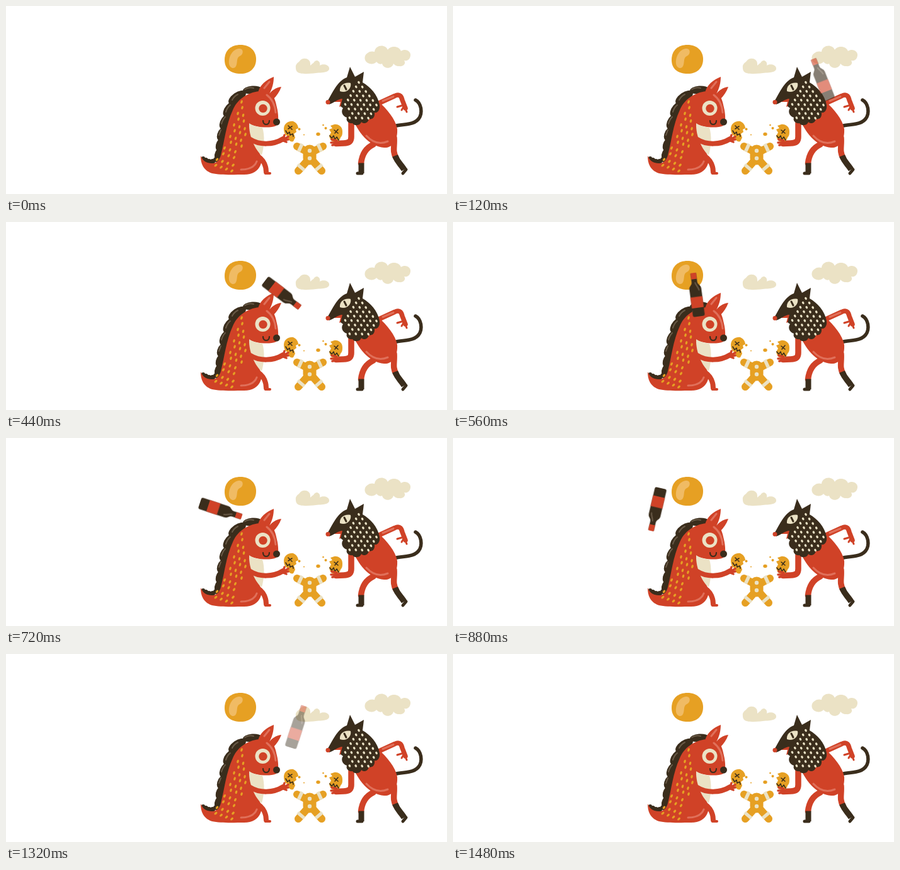
Recreate the animation shown at these times as an HTML page. Size 700 by 300 pixels, loop 1.52 s.

```html
<!DOCTYPE html>
<html lang="en">
<head>
<meta charset="utf-8">
<title>Bottle toss</title>
<style>
html, body { margin: 0; width: 100%; height: 100%; overflow: hidden; background: #fff; }
svg { display: block; width: 700px; height: 300px; }
.red { fill: #d04227; } .dark { fill: #3a2d1c; } .gold { fill: #e6a023; } .cream { fill: #ebe2c5; }
.line { fill: none; stroke-linecap: round; stroke-linejoin: round; }
.flat { stroke-linecap: butt; }
.sr { stroke: #d04227; } .sd { stroke: #3a2d1c; } .sg { stroke: #e6a023; } .sc { stroke: #ebe2c5; }
.shine { stroke: #e0705a; } .sheen { stroke: #695a47; }

.slide { animation: slide 1520ms linear infinite, fade 1520ms linear infinite; }
.spin { animation: spin 1520ms linear infinite; }
@keyframes slide {
  0% { transform: translate(632px, 115px); }
  9.21% { transform: translate(577px, 116px); }
  18.42% { transform: translate(514px, 118px); }
  27.63% { transform: translate(449px, 116px); }
  36.84% { transform: translate(386px, 115px); }
  47.37% { transform: translate(342px, 115px); }
  57.89% { transform: translate(322px, 115px); }
  61.84% { transform: translate(317px, 115px); }
  65.79% { transform: translate(324px, 115px); }
  73.68% { transform: translate(367px, 115px); }
  86.84% { transform: translate(462px, 115px); }
  100% { transform: translate(575px, 115px); }
}
@keyframes spin {
  0% { transform: rotate(0deg); }
  9.21% { transform: rotate(-25deg); }
  18.42% { transform: rotate(-94deg); }
  27.63% { transform: rotate(-209deg); }
  36.84% { transform: rotate(-366deg); }
  47.37% { transform: rotate(-610deg); }
  57.89% { transform: rotate(-885deg); }
  65.79% { transform: rotate(-1090deg); }
  73.68% { transform: rotate(-1272deg); }
  80.26% { transform: rotate(-1366deg); }
  86.84% { transform: rotate(-1422deg); }
  100% { transform: rotate(-1440deg); }
}
@keyframes fade {
  0% { opacity: 0; }
  13% { opacity: 1; }
  78.9% { opacity: 1; }
  93.4%, 100% { opacity: 0; }
}
</style>
</head>
<body>
<svg viewBox="0 0 700 300">
  <!-- sky -->
  <path class="gold" d="M347 86C347 70 358 62 372 62C388 62 397 72 397 85C397 100 386 108 373 108C356 108 347 100 347 86Z"/>
  <path d="M370 68C377 67 378 77 371 80C365 83 368 91 365 96C363 101 355 100 354 92C353 80 360 69 370 68Z" fill="#f0bb64"/>
  <path class="cream" d="M460 99C459 93 463 91 466 88C470 82 479 83 482 88C483 90 483 92 483 95C485 93 486 92 488 91C492 83 500 88 498 95C502 92 512 93 513 99C514 107 500 106 492 107C483 108 472 109 466 107C462 106 460 103 460 99Z"/>
  <path class="cream" d="M577 92C568 90 567 79 574 75C577 72 582 72 585 73C586 62 602 60 606 70C610 63 624 63 627 72C634 67 643 72 642 79C641 87 635 88 632 87C636 93 629 97 624 96C619 96 617 94 615 92C613 101 599 101 597 92C593 94 590 91 588 89C586 92 581 93 577 92Z"/>

  <!-- beast -->
  <g id="mane" class="dark"></g>
  <path class="red" d="M309 239C309 250 312 262 327 267C340 270 362 269 378 269C396 269 406 258 406 243C400 228 392 215 388 196L387 188C394 193 418 196 429 191C434 186 432 170 430 162C428 152 426 145 421 140L402 136C383 138 367 149 360 166C349 190 347 215 341 238C338 250 330 253 320 250C314 248 312 245 309 239Z"/>
  <path class="red" d="M400 139C402 126 413 118 425 113C425 122 423 132 417 142ZM416 143C421 135 428 130 437 129C434 137 430 143 424 149Z"/>
  <g class="line sheen" stroke-width="2">
    <path d="M379 133Q385 129 393 131M359 150Q362 144 368 141M349 169Q351 162 356 158M342 188Q344 181 348 177M338 206L341 198"/>
  </g>
  <path class="cream" d="M386 187C391 191 400 193 407 194C411 207 410 224 406 238C397 232 385 209 386 187Z"/>
  <path class="line sr" stroke-width="8" d="M388 213C402 222 424 222 440 212"/>
  <path class="line sr" stroke-width="8" d="M399 239C408 245 413 254 413 265"/>
  <path class="line sr" stroke-width="4" d="M412 267H419"/>
  <g id="scales" class="gold"></g>
  <g class="line shine" stroke-width="3">
    <path d="M373 261C387 261 395 256 398 248M414 142C422 148 427 158 428 170M418 121L410 131"/>
  </g>
  <circle class="cream" cx="407.5" cy="163" r="12"/>
  <circle class="red" cx="408" cy="163.5" r="6.7"/>
  <circle class="dark" cx="429.5" cy="185" r="5.5"/>
  <path class="line sd" stroke-width="2.2" d="M408 183C408 191 418 191 418 183"/>

  <!-- wolf -->
  <path class="line sd" stroke-width="5.5" d="M616 192C625 189 632 190 640 188C652 186 661 178 658.5 163C657 156 654 152 650 150"/>
  <g class="line sr">
    <path stroke-width="7.5" d="M592 155L617 143.500C626 139 628 146 629 150L634 163"/>
    <path stroke-width="3" d="M628 159L621 161M631 161L628 166M634 164L636 169"/>
    <path stroke-width="9.500" d="M583 221C570 227 565 238 563.500 251M616 210C617 225 613 231 619 242"/>
    <path stroke-width="9.500" d="M548 185V209C548 217 543 219 536 219L524 219.500"/>
  </g>
  <path class="red" d="M551 182C562 206 578 224 600 226C615 227 622 212 621 196C618 180 605 165 591 152L570 165Z"/>
  <g class="line shine" stroke-width="3">
    <path d="M572 207C582 218 594 221 606 216M598 151.500L615 144.500"/>
  </g>
  <g class="line sd">
    <path class="flat" stroke-width="9" d="M564 250.500V267"/>
    <path class="flat" stroke-width="9.500" d="M617.500 239C622 250 627 253 632 261"/>
    <path stroke-width="5" d="M565 267H558M635 261L630 267"/>
  </g>
  <path class="red" d="M517 153L535 145L538 157L529 161L531 153Z"/>
  <path class="dark" d="M510 152C518 140 525 120 541 114L546 97L554 113L568 105L566 122C578 129 590 141 593 158C594 166 590 171 585 170C586 178 581 182 576 180C575 187 568 189 564 185C562 191 553 192 550 187C544 188 539 183 541 178C534 176 531 168 535 163L531 160L534 148C527 148 520 155 513 157Z"/>
  <g id="flecks" class="cream"></g>
  <circle class="red" cx="511" cy="153.5" r="3.5"/>
  <path class="cream" d="M530 136C529 127 537 121 547 123C549 131 541 140 530 136Z"/>
  <path class="line sd" stroke-width="3" d="M537 127L540 133"/>

  <!-- biscuit -->
  <g class="line sg">
    <path stroke-width="12" d="M462 224L477 232M503 224L488 232M464 263L479 246M501 263L486 246"/>
    <path stroke-width="21" d="M482 232V243"/>
  </g>
  <path class="line sc flat" stroke-width="5.5" d="M464.500 232L470 220M500.500 232L495 220M463 253L473.500 262M502 253L491.500 262"/>
  <circle class="cream" cx="482" cy="231" r="3.2"/>
  <circle class="cream" cx="482" cy="243" r="3.2"/>
  <g class="gold">
    <path d="M441 195C442 186 450 183 456 184C461 186 464 191 464 195L460 197L461 201L457 204L459 210L456 216C452 218 447 213 447 208C442 205 441 200 441 195Z"/>
    <path d="M534 200C534 192 527 188 521 189L515 191L518 195L513 197L516 202L513 207C514 213 517 217 522 217C526 218 530 214 531 210C534 207 534 204 534 200Z"/>
    <circle cx="465.5" cy="196.5" r="2"/><circle cx="473" cy="205.5" r="1"/>
    <ellipse cx="495.5" cy="204.5" rx="3.2" ry="2.7"/>
    <circle cx="503.5" cy="190" r="1.3"/><circle cx="507.5" cy="195" r="2"/>
  </g>
  <path class="line sd" stroke-width="1.6" d="M448 191L454 197M454 192L448 196M444 199L447 204L450 201L451 206L455 204L456 208M521 198L527 203M527 197L522 203M514 207L517 211L520 207L522 213L525 209L528 214"/>
  <g class="line sr" stroke-width="3.500">
    <path d="M440 212L442 206M442 212L448 208.500M441 214L448 213M440 215L445 217M525 215L517 213M525 218L516 218M525 221L518 222"/>
  </g>

  <!-- bottle -->
  <g class="slide"><g class="spin">
    <path class="dark" d="M-4.500-33.500H4.500V-19C5-14 9.500-14 9.500-8V33Q9.500 36 6.500 36H-6.500Q-9.500 36-9.500 33V-8C-9.500-14-5-14-4.500-19Z"/>
    <path class="red" d="M-4.500-32.500Q-4.500-34-3-34H3Q4.500-34 4.500-32.500V-24H-4.500ZM-9.500 4.500H9.500V22H-9.500Z"/>
    <path class="line sheen" stroke-width="2" d="M1-18C2-13 5-11 5.500-6"/>
  </g></g>
</svg>
<script>
const dot = (id, x, y, rx, ry, turn) => {
  const e = document.createElementNS('http://www.w3.org/2000/svg', 'ellipse');
  const set = { cx: x, cy: y, rx, ry, transform: `rotate(${turn} ${x} ${y})` };
  for (const k in set) e.setAttribute(k, set[k]);
  document.getElementById(id).append(e);
};

// back crest, from the head down to the tail
[[391, 134, 15, 6.5, -5], [367, 146, 16, 8, -35], [356, 164, 15, 8, -50], [349, 184, 14, 8, -56],
 [344, 203, 13, 7.5, -60], [341, 220, 12, 7, -63], [338, 235, 11, 6, -66],
 [334, 245, 5, 4, 0], [328, 248, 4, 4, 0], [322, 248, 4, 4, 0], [317, 246, 4, 4, 0], [313, 243, 3, 3, 0]]
  .forEach(p => dot('mane', ...p));

for (let i = 0; i < 12; i++) {
  const low = Math.max(0, i - 7), n = Math.min(1 + (i >> 1), 3) + (i > 9);
  const x = 374 - i * 3 - low * 3 + (i % 2) * 4;
  for (let j = 0; j < n; j++) dot('scales', x + j * 8.5, 153 + i * 9.2 + j * 3, 1.7, 2.8, 18 + low * 8);
}

for (let i = 0; i < 6; i++)
  for (let j = 0; j < 7; j++)
    if (i + j < 9 && (j < 6 || i > 1)) dot('flecks', 560 + i * 5.6 - j * 4.3, 122 + i * 7.2 + j * 7, 1.7, 2.3, -30);
</script>
</body>
</html>
```
